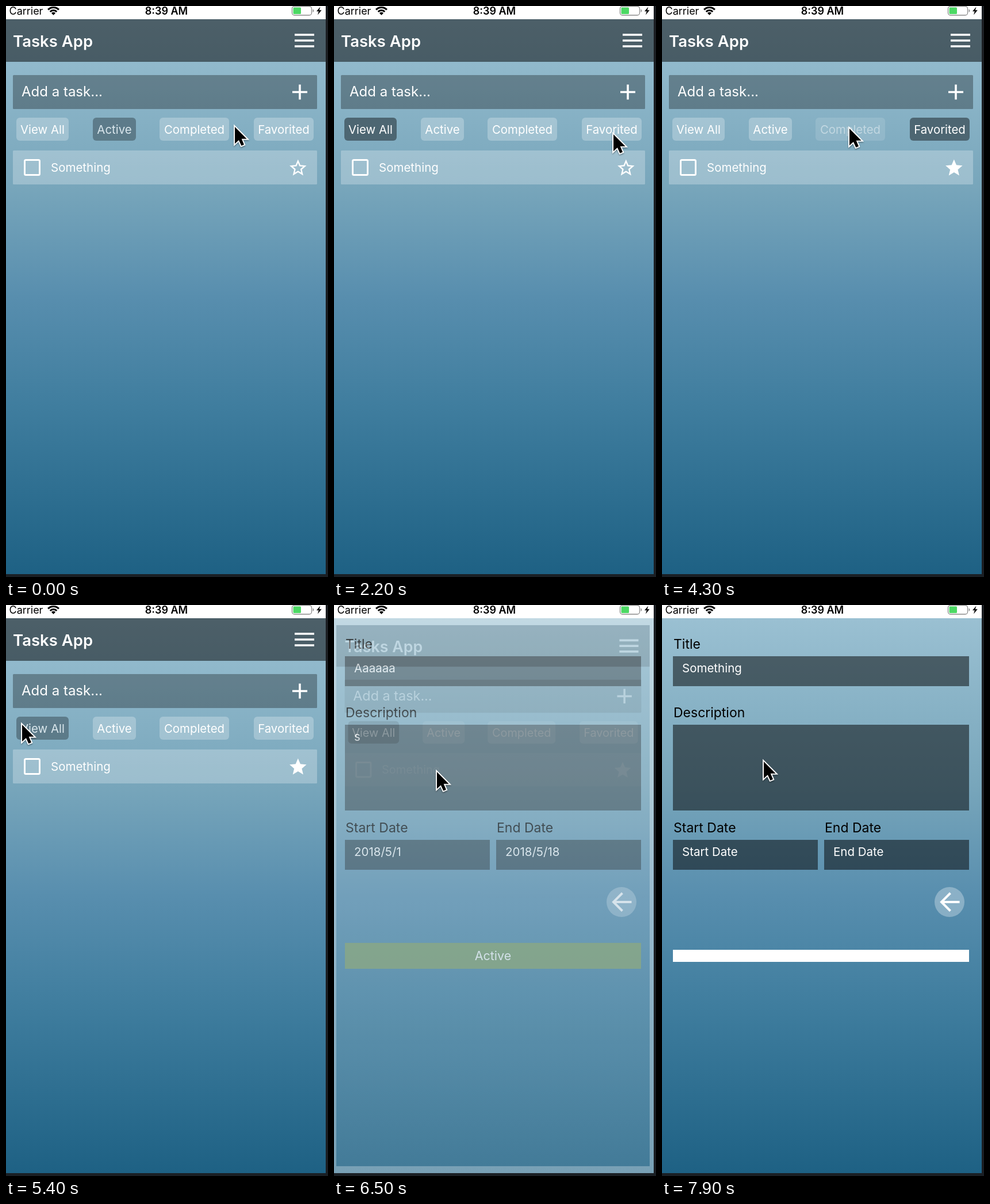
Animation of 560x992 px, one loop 8000 ms. Source, as an HTML page:

```html
<!DOCTYPE html>
<html lang="en">
<head>
<meta charset="utf-8">
<title>Tasks</title>
<style>
  html, body { margin: 0; width: 100%; height: 100%; overflow: hidden; background: #fff; }
  svg { display: block; width: 560px; height: 992px; }
  text { font-family: Inter, "Open Sans", sans-serif; fill: #fff; white-space: pre; }
  .label { font-size: 23px; fill: #000; }
  .value { font-size: 20.5px; }
  .chip text { font-size: 20.4px; text-anchor: middle; }
  .line { fill: none; stroke: #fff; }
</style>
</head>
<body>
<svg id="stage" viewBox="0 0 560 992"></svg>
<script>
const LOOP = 8000, STEP = 100;
const stage = document.getElementById('stage');

const rect = (x, y, w, h, fill, more = '') =>
  `<rect x="${x}" y="${y}" width="${w}" height="${h}" fill="${fill}" ${more}/>`;
const text = (x, y, str, more = '') => `<text x="${x}" y="${y}" ${more}>${str}</text>`;
const shade = a => `rgba(0,0,0,${a})`;
const glow = a => `rgba(255,255,255,${a})`;

const CHIPS = [
  ['View All', 18, 91], ['Active', 151, 75], ['Completed', 267, 121], ['Favorited', 431, 104]
];
const chips = CHIPS.map(([name, x, w]) => `<g class="chip">
  ${rect(x, 194, w, 40, glow(.25), 'rx="6"')}${text(x + w / 2, 222, name)}</g>`).join('');

const FIELDS = [
  ['Title', 19, 89, 515, 52], ['Description', 19, 208, 515, 149],
  ['Start Date', 19, 408, 252, 52], ['End Date', 282, 408, 252, 52]
];
const OLD = ['Aaaaaa', 's', '2018/5/1', '2018/5/18'];
const NEW = ['Something', '', 'Start Date', 'End Date'];
const fields = FIELDS.map(([name, x, y, w, h]) =>
  text(x + 1, y - 13, name, 'class="label"') + rect(x, y, w, h, shade(.5))).join('');
const values = list => list.map((str, i) =>
  text(FIELDS[i][1] + 16, FIELDS[i][2] + 28, str, 'class="value"')).join('');

const STAR = 'M12 17.27L18.18 21l-1.64-7.03L22 9.24l-7.19-.61L12 2 9.19 8.63 2 9.24l5.46 4.73L5.82 21z';
const HOLE = 'M12 15.4l-3.76 2.27 1-4.28-3.32-2.88 4.38-.38L12 6.1l1.71 4.04 4.38.38-3.32 2.88 1 4.28z';

// Wi-Fi arc around (82.5, 15.5)
const arc = (r, w) => {
  const dx = r * Math.sin(.8), y = 15.5 - r * Math.cos(.8);
  return `<path d="M${82.5 - dx} ${y}A${r} ${r} 0 0 1 ${82.5 + dx} ${y}" fill="none" stroke="#000" stroke-width="${w}"/>`;
};

stage.innerHTML = `
  <defs>
    <linearGradient id="sky" gradientUnits="userSpaceOnUse" x1="0" y1="23" x2="0" y2="987">
      <stop offset="0" stop-color="#9ac0d2"/><stop offset=".3" stop-color="#78a6bb"/>
      <stop offset=".5" stop-color="#588eae"/><stop offset=".7" stop-color="#3f7d9e"/>
      <stop offset="1" stop-color="#1e6184"/>
    </linearGradient>
    <filter id="soft" x="-50%" y="-50%" width="200%" height="200%">
      <feDropShadow dx="0" dy="1.5" stdDeviation="1.2" flood-opacity=".4"/>
    </filter>
  </defs>
  ${rect(0, 0, 560, 992, '#fff')}
  <g id="list">
    ${rect(-3, 23, 559, 964, 'url(#sky)')}
    ${rect(-3, 23, 559, 74, shade(.5))}
    ${text(12, 71, 'Tasks App', 'font-size="27.5" font-weight="600"')}
    <path class="line" stroke-width="3.6" d="M502 50h34M502 60h34M502 70h34"/>
    ${rect(12, 120, 529, 59, shade(.3), 'rx="1.5"')}
    ${text(27, 157, 'Add a task...', 'font-size="24"')}
    <path class="line" stroke-width="3.6" d="M498 149.5h26M511 136.5v26"/>
    ${chips}
    <g id="item">
      ${rect(12, 251, 529, 59, glow(.26), 'rx="1.5"')}
      ${rect(32.5, 267.5, 26, 26, 'none', 'rx="2" stroke="#fff" stroke-width="3"')}
      ${text(78, 288, 'Something', 'class="value"')}
      <path id="star" fill="#fff" fill-rule="evenodd" transform="translate(490.2 263.6) scale(1.47)"/>
    </g>
  </g>
  <g id="detail">
    ${rect(-3, 23, 559, 964, 'url(#sky)')}
    ${fields}
    <g id="old">
      ${values(OLD)}
      ${rect(19, 587, 515, 45, '#7a9a66')}
      ${text(276.5, 617, 'Active', 'font-size="21.5" text-anchor="middle"')}
    </g>
    <g id="new">${values(NEW)}${rect(19, 599, 515, 21, '#fff')}</g>
    <circle cx="500" cy="516" r="26" fill="${glow(.3)}"/>
    <path class="line" stroke-width="4" d="M501.5 500.5L486 516l15.500 15.500M485 516h32.500"/>
  </g>
  ${rect(0, 0, 556, 23, '#fff')}
  ${text(5.5, 15, 'Carrier', 'font-size="18" style="fill:#000"')}
  ${arc(13, 3.2)}${arc(8, 3)}<path d="M82.500 16L79 12.300a5 5 0 0 1 7 0z"/>
  ${text(279, 15, '8:39 AM', 'font-size="18" font-weight="600" text-anchor="middle" style="fill:#000"')}
  ${rect(497.500, .5, 34, 15.500, '#fff', 'rx="4" stroke="#8a8a8a" stroke-width="1.300"')}
  ${rect(499.500, 2.500, 13.500, 11.500, '#4cd964', 'rx="1.500"')}
  <path d="M533.500 5.500a3 3 0 0 1 0 5.500z" fill="#8a8a8a"/>
  <path d="M546.500 1.500L540 9.300h3.800L542 15.500l6.800-8.300h-4z"/>
  ${rect(556, 0, 4, 992, '#1b1e22')}${rect(0, 987, 560, 5, '#1a1f24')}
  <g id="cursor" filter="url(#soft)">
    <path d="M0 0V17L4 13.300 6.600 19 9.300 17.900 6.800 12H12z" transform="translate(1 2) scale(1.72)"
      stroke="#fff" stroke-width="2.200" paint-order="stroke" stroke-linejoin="miter"/>
  </g>`;

const $ = id => document.getElementById(id);
const [list, item, star, detail, oldData, newData, cursor] =
  ['list', 'item', 'star', 'detail', 'old', 'new', 'cursor'].map($);
const chipEls = [...document.querySelectorAll('.chip')];

// time, x, y of the pointer tip
const PATH = [
  [0, 397, 208], [300, 440, 235], [600, 512, 288], [900, 505, 285], [1200, 420, 262],
  [1500, 150, 235], [1700, 50, 212], [1900, 60, 214], [2200, 485, 221], [2500, 508, 286],
  [2900, 505, 284], [3300, 478, 222], [3900, 480, 218], [4300, 325, 211], [4500, 320, 213],
  [4900, 150, 215], [5200, 30, 206], [5400, 27, 206], [5700, 80, 240], [6000, 170, 287],
  [6500, 178, 288], [6700, 170, 284], [7200, 180, 300], [7600, 170, 285], [7900, 176, 270],
  [8000, 176, 270]
];
// chip index, press time, release time
const TAPS = [[1, -300, -100], [0, 1600, 1800], [3, 3200, 3400], [2, 4200, 4400], [0, 5100, 5300]];
const STARRED = 2700, OPEN = 6300, OPEN_TIME = 400;

const clamp = v => Math.max(0, Math.min(1, v));

function pointer(t) {
  const i = PATH.findIndex(p => p[0] > t);
  const [t0, x0, y0] = PATH[i - 1], [t1, x1, y1] = PATH[i];
  const u = (t - t0) / (t1 - t0), k = u * u * (3 - 2 * u);
  return [x0 + (x1 - x0) * k, y0 + (y1 - y0) * k];
}

function pressed(t, down, up) {
  if (t < down) return 1;
  return t < up ? .5 : .5 + .5 * clamp((t - up) / 250);
}

function draw(t) {
  const active = TAPS.filter(tap => tap[2] <= t).pop()[0];
  chipEls.forEach((el, i) => {
    el.firstElementChild.setAttribute('fill', i === active ? '#4d6672' : glow(.25));
    const fade = TAPS.filter(tap => tap[0] === i).map(tap => pressed(t, tap[1], tap[2]));
    el.setAttribute('opacity', Math.min(1, ...fade));
  });
  item.setAttribute('opacity', active === 2 ? 0 : t >= 6100 ? .4 : 1);
  star.setAttribute('d', t >= STARRED ? STAR : STAR + HOLE);

  const p = clamp((t - OPEN) / OPEN_TIME);
  list.setAttribute('opacity', 1 - .8 * p);
  list.setAttribute('transform', `translate(276.5 505) scale(${1 - .05 * p}) translate(-276.5 -505)`);
  detail.setAttribute('opacity', Math.min(1, 1.2 * p));
  oldData.setAttribute('visibility', p < .75 ? 'visible' : 'hidden');
  newData.setAttribute('visibility', p < .75 ? 'hidden' : 'visible');
  cursor.setAttribute('transform', `translate(${pointer(t)})`);
}

const start = performance.now();
function tick() {
  const t = (performance.now() - start) % LOOP;
  draw(Math.floor(t / STEP) * STEP);
  requestAnimationFrame(tick);
}
tick();
</script>
</body>
</html>
```
